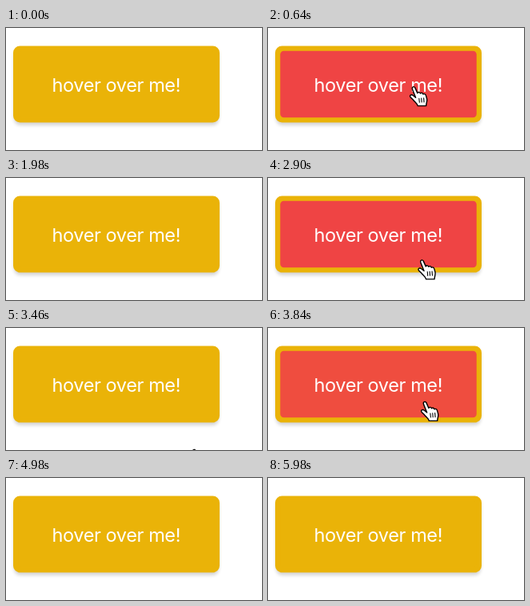
An HTML page for the animation above (7350 ms loop, 320 px wide and 153 px high).

```html
<!DOCTYPE html>
<html lang="en">
<head>
<meta charset="utf-8">
<title>Hover button</title>
<style>
  html, body { margin: 0; width: 100%; height: 100%; overflow: hidden; background: #fff; }
  svg { display: block; width: 100vw; height: 100vh; }
  text { font: 400 23.5px Inter, Roboto, sans-serif; letter-spacing: -0.4px; fill: #fff; }
</style>
</head>
<body>
<svg viewBox="0 0 320 153">
  <defs>
    <filter id="soft" x="-10%" y="-20%" width="120%" height="140%">
      <feGaussianBlur stdDeviation="2.2"/>
    </filter>
  </defs>
  <rect x="10" y="27" width="256" height="95" rx="8" fill="#000" opacity=".17" filter="url(#soft)"/>
  <rect x="9" y="22.5" width="258" height="96" rx="8.5" fill="#eab308"/>
  <rect id="face" x="15.3" y="28.8" width="245.4" height="83.4" rx="4.5" fill="#eab308"/>
  <text x="137.8" y="79.8" text-anchor="middle">hover over me!</text>
  <g id="hand" visibility="hidden" stroke="#000" stroke-linejoin="round" stroke-linecap="round">
    <path fill="#fff" stroke-width="1.4" d="M8.4 15.2 L4.2 4.8 C3.2 2 6.2 .4 7.6 2.8
      L10.6 9.6 C11.4 8 13.6 8.2 14.2 10 C15.2 8.8 17.2 9.2 17.7 11 C19 10 20.8 10.8 21.2 12.6
      L22.4 17 C23 20 21.6 21.6 21.4 25.6 L11 25.6 C10.6 22.8 7 20.6 5.2 18
      L1.8 14.6 C.2 12.4 3 10.8 5 12.4 Z"/>
    <path fill="none" stroke-width="1.1" d="M12.6 16.2 l.5 5 M15.5 16 l.4 5 M18.4 15.8 l.4 5"/>
  </g>
</svg>
<script>
  const LOOP = 7350, FADE = 300, EDGE = 117;
  const YELLOW = [234, 179, 8], RED = [239, 68, 68];
  const START = [229.5, 151.2], END = [230, 154];
  // The pointer comes in from below, stops at "top", then goes back out.
  const visits = [
    { enter: 80, stop: 800, leave: 980, gone: 1280, top: [173.5, 68] },
    { enter: 2400, stop: 2700, leave: 2740, gone: 3110, top: [176.5, 89] },
    { enter: 3460, stop: 4160, leave: 4220, gone: 4335, top: [180, 75] }
  ];
  const face = document.getElementById('face');
  const hand = document.getElementById('hand');

  const clamp = v => Math.min(1, Math.max(0, v));
  const mix = (a, b, k) => a.map((v, i) => v + (b[i] - v) * k);

  // Moments at which the pointer crosses the lower edge of the button
  for (const v of visits) {
    const up = (START[1] - EDGE) / (START[1] - v.top[1]);
    const down = (EDGE - v.top[1]) / (END[1] - v.top[1]);
    v.on = v.enter + (v.stop - v.enter) * (1 - Math.sqrt(1 - up));
    v.off = v.leave + (v.gone - v.leave) * Math.sqrt(down);
  }

  // cubic-bezier(.4, 0, .2, 1)
  function ease(x) {
    let lo = 0, hi = 1;
    for (let i = 0; i < 24; i++) {
      const s = (lo + hi) / 2, r = 1 - s;
      if (1.2 * s * r * r + 0.6 * s * s * r + s ** 3 < x) lo = s; else hi = s;
    }
    return lo * lo * (3 - 2 * lo);
  }

  function pointer(v, t) {
    if (t < v.leave) {
      const u = clamp((t - v.enter) / (v.stop - v.enter));
      return mix(START, v.top, 1 - (1 - u) ** 2);
    }
    return mix(v.top, END, ((t - v.leave) / (v.gone - v.leave)) ** 2);
  }

  function draw(t) {
    let heat = 0;
    for (const v of visits) {
      heat += ease(clamp((t - v.on) / FADE)) - ease(clamp((t - v.off) / FADE));
    }
    face.setAttribute('fill', `rgb(${mix(YELLOW, RED, heat).map(Math.round)})`);

    const v = visits.find(v => t >= v.enter && t < v.gone);
    hand.setAttribute('visibility', v ? 'visible' : 'hidden');
    if (v) hand.setAttribute('transform', `translate(${pointer(v, t)})`);
  }

  const begin = performance.now();
  function tick() {
    draw((performance.now() - begin) % LOOP);
    requestAnimationFrame(tick);
  }
  tick();
</script>
</body>
</html>
```
